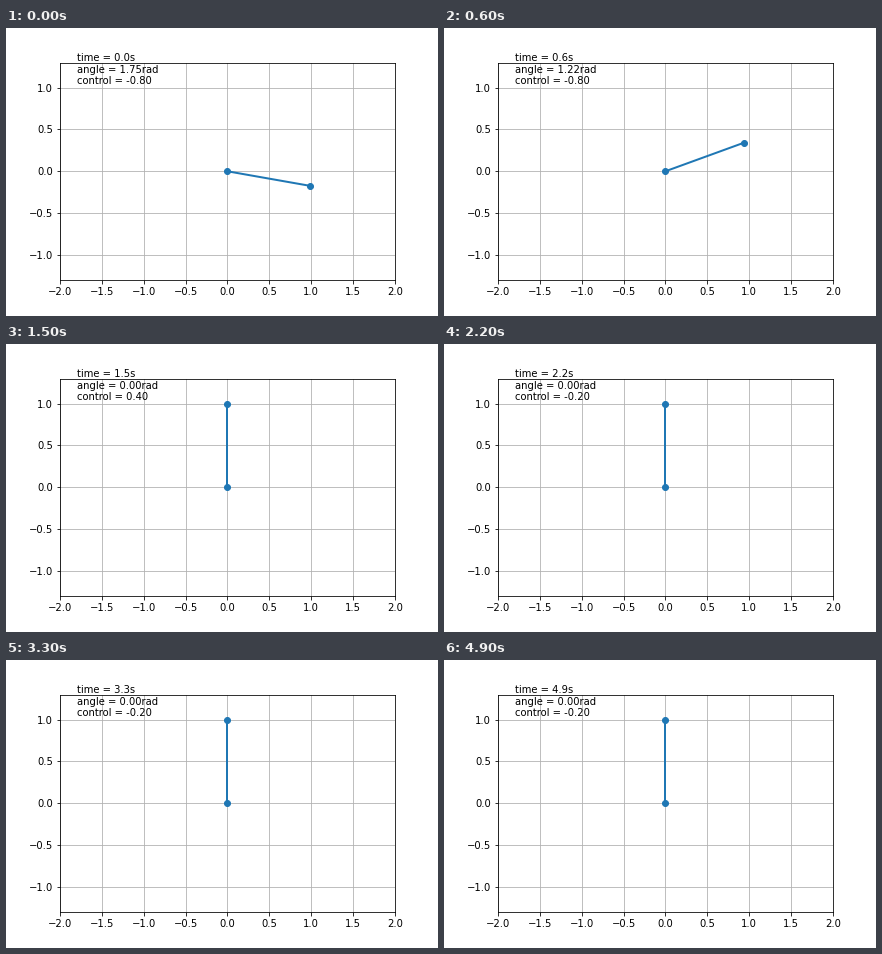
Recreate the animation shown at these times as a matplotlib script. Size 432x288 px, loop 5000 ms.

```python
import matplotlib.pyplot as plt
import numpy as np
from matplotlib.animation import FuncAnimation

FRAMES = 50
STEP = 0.1  # seconds per frame

# Swing up to vertical, then a short disturbance around 2.5 s
KEY_TIMES = [0, 0.8, 1.3, 1.5, 2.4, 2.5, 2.6]
KEY_DEGREES = [100, 60, 10, 0, 0, 5, 0]

plt.rcParams["font.family"] = "DejaVu Sans"
plt.rcParams["font.size"] = 10

fig = plt.figure(figsize=(6, 4), dpi=72)
fig.subplots_adjust(left=0.125, right=0.9, bottom=0.125, top=0.88)
ax = fig.add_subplot(111, xlim=(-2, 2), ylim=(-1.3, 1.3))
ax.grid()
rod, = ax.plot([], [], "o-", lw=2)
readout = ax.text(0.05, 0.9, "", transform=ax.transAxes)


def angle_at(time):
    """Angle from the upright position, in radians."""
    return np.radians(np.interp(time, KEY_TIMES, KEY_DEGREES))


def control_at(time):
    if time < 0.85:
        return -0.8
    return 0.4 if time < 1.55 else -0.2


def update(frame):
    time = frame * STEP
    angle = angle_at(time)
    rod.set_data([0, np.sin(angle)], [0, np.cos(angle)])
    readout.set_text(
        f"time = {time:.1f}s\n"
        f"angle = {abs(angle):.2f}rad\n"
        f"control = {control_at(time):.2f}"
    )
    return rod, readout


animation = FuncAnimation(fig, update, frames=FRAMES, interval=1000 * STEP,
                          repeat=True, repeat_delay=0)
plt.show()
```
